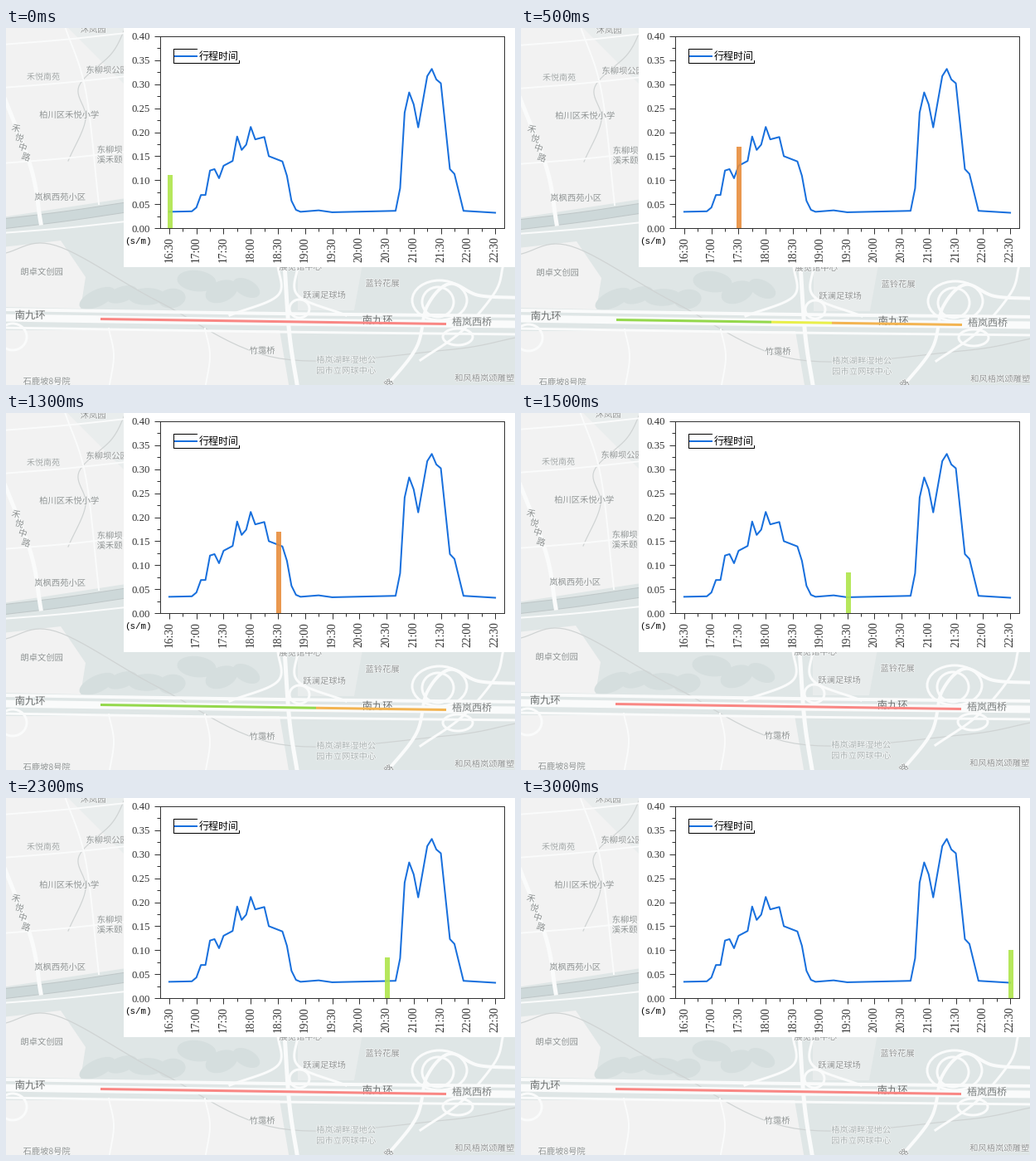
Write a matplotlib script that moves like this. It is 614 px wide and 430 px high and loops after 3500 ms.

```python
import numpy as np
import matplotlib.pyplot as plt
from matplotlib import patheffects
from matplotlib.animation import FuncAnimation
from matplotlib.patches import Ellipse, Polygon, Rectangle
from matplotlib.ticker import FormatStrFormatter, MultipleLocator

W, H, DPI = 614, 430, 100
CJK = "Noto Sans CJK JP"
PARK, PARK_DARK, BLOCK = "#dfe6e6", "#d5dede", "#f2f2f2"
RIVER, BANK, RAIL, ROAD = "#cdd8d9", "#bfc7c8", "#cfd3d3", "#fafbfb"
BLUE, INK = "#176fdd", "#333333"
LIME, AMBER, ALERT = "#aee54a", "#e88d3c", "#ff4f4f"
FREE, YELLOW, SLOW, JAM, PALE = "#94d84c", "#e9ef4a", "#f3b451", "#dc3a3c", "#f98784"
START, END = 114, 531

# key points of the curve: five-minute slot, travel time in ms per metre
CURVE = [(0, 34), (5, 35), (6, 43), (7, 69), (8, 69), (9, 120), (10, 123), (11, 104),
         (12, 130), (14, 140), (15, 191), (16, 163), (17, 174), (18, 211), (19, 185),
         (21, 190), (22, 150), (25, 139), (26, 109), (27, 57), (28, 38), (29, 34),
         (33, 37), (36, 33), (50, 36), (51, 83), (52, 241), (53, 283), (54, 258),
         (55, 210), (57, 317), (58, 332), (59, 310), (60, 302), (62, 123), (63, 113),
         (65, 36), (72, 32)]

# bar height, road colours, where they change, map shift
CALM = ([PALE], [], (0, 0))
STEPS = [
    (0.111, *CALM),
    (0.170, [FREE, YELLOW, SLOW], [301, 374], (1, 1)),
    (0.170, [FREE, SLOW], [374], (0, 1)),
    (0.085, *CALM),
    (0.085, *CALM),
    (0.372, [SLOW, JAM, SLOW], [244, 464], (1, 1)),
    (0.100, *CALM),
]


def pt(px):
    return px * 72 / DPI


def add_axes(x, y, w, h):
    return fig.add_axes([x / W, 1 - (y + h) / H, w / W, h / H])


def pixel_axes(x, y, w, h):
    """Axes whose data units are stage pixels, y pointing down."""
    ax = add_axes(x, y, w, h)
    ax.set(xlim=(x, x + w), ylim=(y + h, y), xticks=[], yticks=[])
    ax.spines[:].set_visible(False)
    return ax


def smooth(points, steps=14):
    """Catmull-Rom curve through the points."""
    p = np.array(points, float)
    p = np.vstack([2 * p[0] - p[1], p, 2 * p[-1] - p[-2]])
    t = np.linspace(0, 1, steps)[:, None]
    return np.vstack([
        0.5 * (2 * b + (c - a) * t + (2 * a - 5 * b + 4 * c - d) * t**2
               + (3 * b - a - 3 * c + d) * t**3)
        for a, b, c, d in zip(p, p[1:], p[2:], p[3:])])


def area(color, *points):
    land.add_patch(Polygon(points, fc=color, ec="none", zorder=1))


def road(px, *points, color=ROAD):
    land.plot(*smooth(points).T, color=color, lw=pt(px), zorder=2)


def ring(x, y, rx, ry):
    land.add_patch(Ellipse((x, y), 2 * rx, 2 * ry, fc="none", ec=ROAD, lw=pt(3), zorder=2))


def label(x, y, text, px=10.3, color="#8f9292", angle=0):
    t = land.text(x, y, text, family=CJK, size=pt(px), color=color, rotation=angle,
                  ha="center", va="center_baseline", zorder=5, clip_on=True)
    t.set_path_effects([patheffects.withStroke(linewidth=1, foreground="#f4f6f6")])


def draw_land():
    # parks and blocks
    area(PARK, (-5, 228), (145, 205), (620, 205), (620, 435), (-5, 435))
    area("#e9eded", (70, -5), (145, -5), (145, 70))
    area(BLOCK, (-5, 264), (66, 256), (96, 300), (90, 338), (-5, 336))
    area(BLOCK, (-5, 364), (330, 364), (342, 435), (-5, 435))
    area("#e8ecec", (352, 285), (430, 285), (420, 340), (352, 340))
    rng = np.random.default_rng(4)
    for x in np.linspace(110, 290, 7):
        w, h = rng.uniform(22, 48), rng.uniform(14, 26)
        land.add_patch(Ellipse((x, rng.uniform(300, 326)), w, h, fc=PARK_DARK,
                               angle=rng.uniform(-30, 30), zorder=1))

    # river and railways
    road(12, (-5, 236), (70, 227), (145, 216), color=RIVER)
    for y in (230, 242):
        road(1, (-5, y), (70, y - 9), (145, y - 20), color=BANK)
    road(1.2, (-5, 272), (60, 262), (185, 330), (330, 398), (530, 388), (620, 372), color=RAIL)
    road(1.2, (75, 160), (96, 110), (88, 70), (128, 30), (146, -5), color=RAIL)

    # streets
    road(5, (-5, 76), (30, 168), (42, 235))
    road(2, (70, -5), (96, 75), (112, 212))
    for y in (20, 72, 163, 247):
        road(2, (-5, y), (70, y - 6), (145, y - 14))
    for x in (124, 240):
        road(2, (x, 362), (x + 6, 395), (x, 435))

    # ring road
    for y, px in ((339, 4), (349, 9), (361, 3)):
        road(px, (-5, y), (330, y + 5), (620, y + 8))

    # interchanges
    road(5, (336, 285), (342, 370), (352, 435))
    for side in (-1, 1):
        road(3, (340 + 12 * side, 285), (340 + 12 * side, 322), (340 + 70 * side, 346))
    ring(354, 338, 12, 11)
    ring(8, 372, 17, 16)
    road(4, (456, 435), (495, 385), (508, 335), (535, 308), (570, 322), (620, 325))
    road(3, (500, 400), (550, 365), (590, 318), (600, 285))
    ring(523, 328, 33, 24)
    ring(521, 330, 19, 18)
    ring(545, 372, 18, 10)


def draw_labels():
    label(105, 1, "沐岚园")
    label(45, 58, "禾悦南苑", 10, "#a3a6a6")
    label(122, 50, "东柳坝公园")
    label(76, 104, "柏川区禾悦小学")
    label(125, 146, "东柳坝")
    label(125, 158, "溪禾颐")
    for i, char in enumerate("禾悦中路"):
        label(12 + 4 * i, 119 + 11.5 * i, char, 10.5, angle=-18)
    label(65, 203, "岚枫西苑小区")
    label(43, 293, "朗卓文创园")
    label(355, 287, "展览馆中心")
    label(454, 307, "蓝铃花展")
    label(384, 321, "跃澜足球场")
    label(29, 345, "南九环", 12.3, "#6c7070")
    label(448, 351, "南九环", 12.3, "#6c7070")
    label(562, 353, "梧岚西桥", 12, "#7d8181")
    label(309, 388, "竹霭桥")
    label(410, 399, "梧岚湖畔湿地公", color="#a9b1b1")
    label(410, 412, "园市立网球中心", color="#a9b1b1")
    label(49, 425, "石鹿坡8号院")
    label(577, 421, "和风梧岚颂雕塑")
    label(462, 425, "路", angle=40)


def draw_panel():
    panel = pixel_axes(142, 0, 472, 288)
    panel.text(143, 257, "(s/m)", family="Liberation Mono", size=pt(10.9), va="center")
    panel.plot((230, 202, 202, 281, 281), (25, 25, 42, 42, 39), color="black", lw=pt(1))
    panel.plot((204, 230), (34, 34), color=BLUE, lw=pt(2))
    panel.text(232.5, 33, "行程时间", family=CJK, size=pt(12), va="center_baseline")


def draw_plot():
    ax = add_axes(186, 10, 415, 231)
    ax.set(xlim=(-2, 74), ylim=(0, 0.4), facecolor="none")
    times = [f"{m // 60}:{m % 60:02d}" for m in range(990, 1351, 30)]
    ax.set_xticks(range(0, 73, 6), times, rotation=90)
    ax.xaxis.set_minor_locator(MultipleLocator(3))
    ax.yaxis.set_major_locator(MultipleLocator(0.05))
    ax.yaxis.set_minor_locator(MultipleLocator(0.025))
    ax.yaxis.set_major_formatter(FormatStrFormatter("%.2f"))
    ax.tick_params(which="both", width=pt(1), colors=INK, labelfontfamily="Liberation Serif")
    ax.tick_params(which="major", length=pt(7))
    ax.tick_params(which="minor", length=pt(4))
    ax.tick_params(axis="x", pad=pt(3), labelsize=pt(13.5))
    ax.tick_params(axis="y", pad=pt(5), labelsize=pt(12.8))
    ax.spines[:].set(linewidth=pt(1), color=INK)
    slots, values = np.array(CURVE).T
    ax.plot(slots, values / 1000, color=BLUE, lw=pt(2), zorder=3)
    return ax


def bar_color(height):
    return LIME if height < 0.15 else AMBER if height < 0.3 else ALERT


def update(i):
    height, colors, breaks, (dx, dy) = STEPS[i]
    bar.set(x=12 * i - 0.36, height=height, facecolor=bar_color(height))
    land.set(xlim=(-dx, W - dx), ylim=(H - dy, -dy))
    ends = [START, *breaks, END]
    for k, line in enumerate(sections):
        line.set_visible(k < len(colors))
        if k < len(colors):
            x = np.array(ends[k:k + 2])
            line.set_data(x, 350.5 + 6 * (x - START) / (END - START))
            line.set_color(colors[k])
    return [bar, *sections]


fig = plt.figure(figsize=(W / DPI, H / DPI), dpi=DPI)
land = pixel_axes(0, 0, W, H)
land.set_facecolor(BLOCK)
draw_land()
draw_labels()
draw_panel()
plot = draw_plot()
bar = plot.add_patch(Rectangle((0, 0), 1.1, 0, ec="none", alpha=0.9, zorder=4))
sections = [land.plot([], [], lw=pt(3), solid_capstyle="butt", zorder=6)[0]
            for _ in range(3)]

anim = FuncAnimation(fig, update, frames=len(STEPS), interval=500,
                     repeat=True, repeat_delay=0, blit=False)
plt.show()
```
